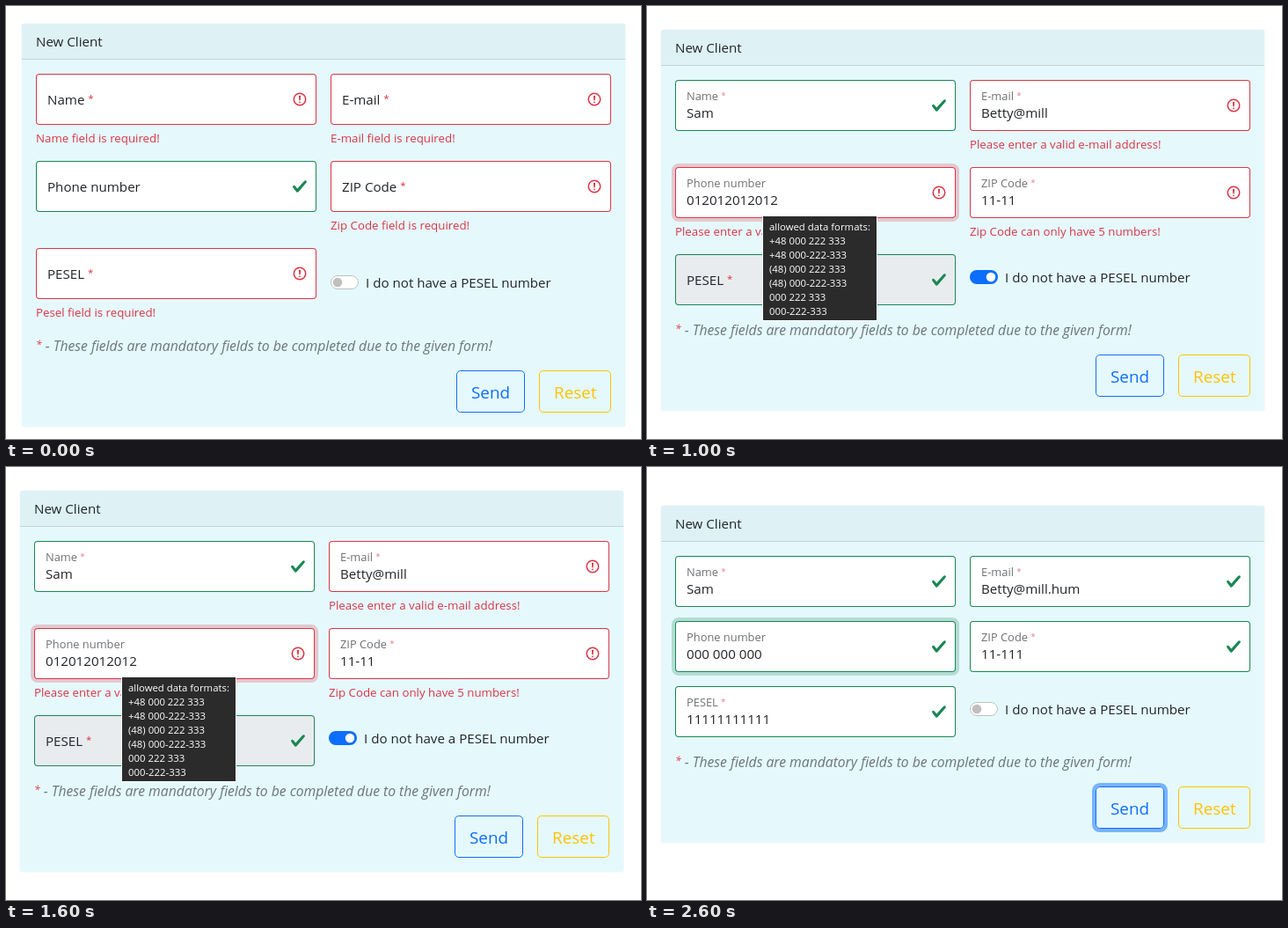
An HTML page with a canvas for the animation above (3000 ms loop, 722 px wide and 492 px high).

```html
<!DOCTYPE html>
<html lang="en">
<head>
<meta charset="utf-8">
<title>Client form</title>
<style>
  html, body { margin: 0; width: 100%; height: 100%; overflow: hidden; background: #fff; }
  canvas { display: block; width: 722px; height: 492px; }
</style>
</head>
<body>
<canvas id="stage" width="722" height="492"></canvas>
<script>
const ctx = document.getElementById('stage').getContext('2d');
const STEP = 1000;
const RED = '#dc3545', GREEN = '#198754', BLUE = '#0d6efd', YELLOW = '#ffc107';
const INK = '#212529', MUTED = '#6c757d';
const FIELD_W = 319, FIELD_H = 58, COLUMN = 335;
const CHECK = new Path2D('M2.3 6.73L.6 4.53c-.4-1.04.46-1.4 1.1-.8l1.1 1.4 3.4-3.8c.6-.63 1.6-.27 1.2.7l-4 4.6c-.43.5-.8.4-1.1.1z');
const WARNING = new Path2D('M5.8 3.6h.4L6 6.5z');

const FORMATS = ['allowed data formats:', '+48 000 222 333', '+48 000-222-333',
  '(48) 000 222 333', '(48) 000-222-333', '000 222 333', '000-222-333'];

// Field order: name, e-mail, phone, ZIP, PESEL.
const LABELS = ['Name', 'E-mail', 'Phone number', 'ZIP Code', 'PESEL'];
const STATES = [
  {
    x: 34, top: 20, bottom: 478, pitch: 99, toggle: 314, note: 392,
    fields: [
      { error: 'Name field is required!' },
      { error: 'E-mail field is required!' },
      {},
      { error: 'Zip Code field is required!' },
      { error: 'Pesel field is required!' }
    ]
  },
  {
    x: 32, top: 27, bottom: 460, pitch: 99, toggle: 308, on: true, note: 374, tooltip: true,
    fields: [
      { value: 'Sam' },
      { value: 'Betty@mill', error: 'Please enter a valid e-mail address!' },
      { value: '012012012012', error: 'Please enter a valid number!', focus: true },
      { value: '11-11', error: 'Zip Code can only have 5 numbers!' },
      { disabled: true }
    ]
  },
  {
    x: 32, top: 44, bottom: 427, pitch: 74, toggle: 275, note: 341, sendFocus: true,
    fields: [
      { value: 'Sam' },
      { value: 'Betty@mill.hum' },
      { value: '000 000 000', focus: true },
      { value: '11-111' },
      { value: '11111111111' }
    ]
  }
];

function box(x, y, w, h, r, color) {
  ctx.fillStyle = color;
  ctx.beginPath();
  ctx.roundRect(x, y, w, h, r);
  ctx.fill();
}

function outline(x, y, w, h, r, color) {
  ctx.strokeStyle = color;
  ctx.lineWidth = 1;
  ctx.beginPath();
  ctx.roundRect(x + .5, y + .5, w - 1, h - 1, r - .5);
  ctx.stroke();
}

function ring(x, y, w, h, r, color, alpha) {
  ctx.globalAlpha = alpha;
  ctx.strokeStyle = color;
  ctx.lineWidth = 4;
  ctx.beginPath();
  ctx.roundRect(x - 2, y - 2, w + 4, h + 4, r + 2);
  ctx.stroke();
  ctx.globalAlpha = 1;
}

function dot(x, y, r, color) {
  ctx.fillStyle = color;
  ctx.beginPath();
  ctx.arc(x, y, r, 0, Math.PI * 2);
  ctx.fill();
}

// Draws text and returns the x where it ends.
function text(str, x, y, size, color, style = '') {
  ctx.font = `${style} ${size}px "Open Sans", "Noto Sans", sans-serif`;
  ctx.fillStyle = color;
  ctx.fillText(str, x, y);
  return x + ctx.measureText(str).width;
}

// A small raised asterisk.
function star(x, y, size, style) {
  return text('*', x, y - size * .17, size * .76, RED, style);
}

function icon(cx, cy, valid) {
  ctx.save();
  ctx.translate(cx - 9, cy - 9);
  if (valid) {
    ctx.scale(2.25, 2.25);
    ctx.fillStyle = GREEN;
    ctx.fill(CHECK);
  } else {
    ctx.scale(1.5, 1.5);
    ctx.strokeStyle = RED;
    ctx.lineWidth = 1;
    ctx.lineJoin = 'round';
    ctx.beginPath();
    ctx.arc(6, 6, 4.5, 0, Math.PI * 2);
    ctx.stroke();
    ctx.stroke(WARNING);
    dot(6, 8.2, .6, RED);
  }
  ctx.restore();
}

function drawField(label, required, field, x, y) {
  const color = field.error ? RED : GREEN;
  if (field.focus) ring(x, y, FIELD_W, FIELD_H, 4, color, .25);
  box(x, y, FIELD_W, FIELD_H, 4, color);
  box(x + 1, y + 1, FIELD_W - 2, FIELD_H - 2, 3, field.disabled ? '#e9ecef' : '#fff');
  icon(x + FIELD_W - 19, y + 29, !field.error);

  const size = field.value ? 12.87 : 15.14;
  const base = y + (field.value ? 23 : 35);
  ctx.globalAlpha = field.value ? .65 : 1;
  const end = text(required ? label + ' ' : label, x + 13, base, size, INK);
  if (required) star(end, base, size);
  ctx.globalAlpha = 1;

  if (field.value) text(field.value, x + 13, y + 43, 15.14, INK);
  if (field.error) text(field.error, x, y + 78, 13.3, RED);
}

function drawSwitch(x, cy, on) {
  box(x, cy - 8, 32, 16, 8, on ? BLUE : '#fff');
  if (!on) outline(x, cy - 8, 32, 16, 8, '#bfbfbf');
  dot(x + (on ? 24 : 8), cy, 5.25, on ? '#fff' : '#bfbfbf');
  text('I do not have a PESEL number', x + 40, cy + 6, 15.14, INK);
}

function drawButton(label, x, y, w, color, focused) {
  if (focused) ring(x, y, w, 48, 4.8, color, .5);
  outline(x, y, w, 48, 4.8, color);
  text(label, x + 17, y + 32, 18.9, color);
}

function drawTooltip(x, y) {
  box(x, y, 131, 120, 0, '#fff');
  box(x + 1, y + 1, 129, 118, 0, '#2b2b2b');
  FORMATS.forEach((line, i) => text(line, x + 8, y + 17 + i * 16, 11.35, '#fff'));
}

function drawState(s) {
  ctx.fillStyle = '#fff';
  ctx.fillRect(0, 0, 722, 492);

  const left = s.x - 16, height = s.bottom - s.top;
  outline(left - 1, s.top - 1, 688, height + 2, 4, '#f8f9fa');
  box(left, s.top, 686, height, 3, '#e5f9fd');
  box(left, s.top, 686, 40, [3, 3, 0, 0], '#def2f5');
  box(left, s.top + 40, 686, 1, 0, '#c3d4d7');
  text('New Client', s.x, s.top + 26, 15.14, INK);

  s.fields.forEach((field, i) => drawField(LABELS[i], i !== 2, field,
    s.x + (i % 2) * COLUMN, s.top + 57 + Math.floor(i / 2) * s.pitch));
  drawSwitch(s.x + COLUMN, s.toggle, s.on);

  const end = star(s.x, s.note, 15.73, 'italic');
  text(' - These fields are mandatory fields to be completed due to the given form!',
    end, s.note, 15.73, MUTED, 'italic');

  const buttonY = s.bottom - 64;
  drawButton('Send', s.x + 478, buttonY, 78, BLUE, s.sendFocus);
  drawButton('Reset', s.x + 572, buttonY, 82, YELLOW);
  if (s.tooltip) drawTooltip(131, 238);
}

const start = performance.now();
function tick() {
  const elapsed = performance.now() - start;
  drawState(STATES[Math.floor(elapsed / STEP) % STATES.length]);
  requestAnimationFrame(tick);
}
tick();
</script>
</body>
</html>
```
